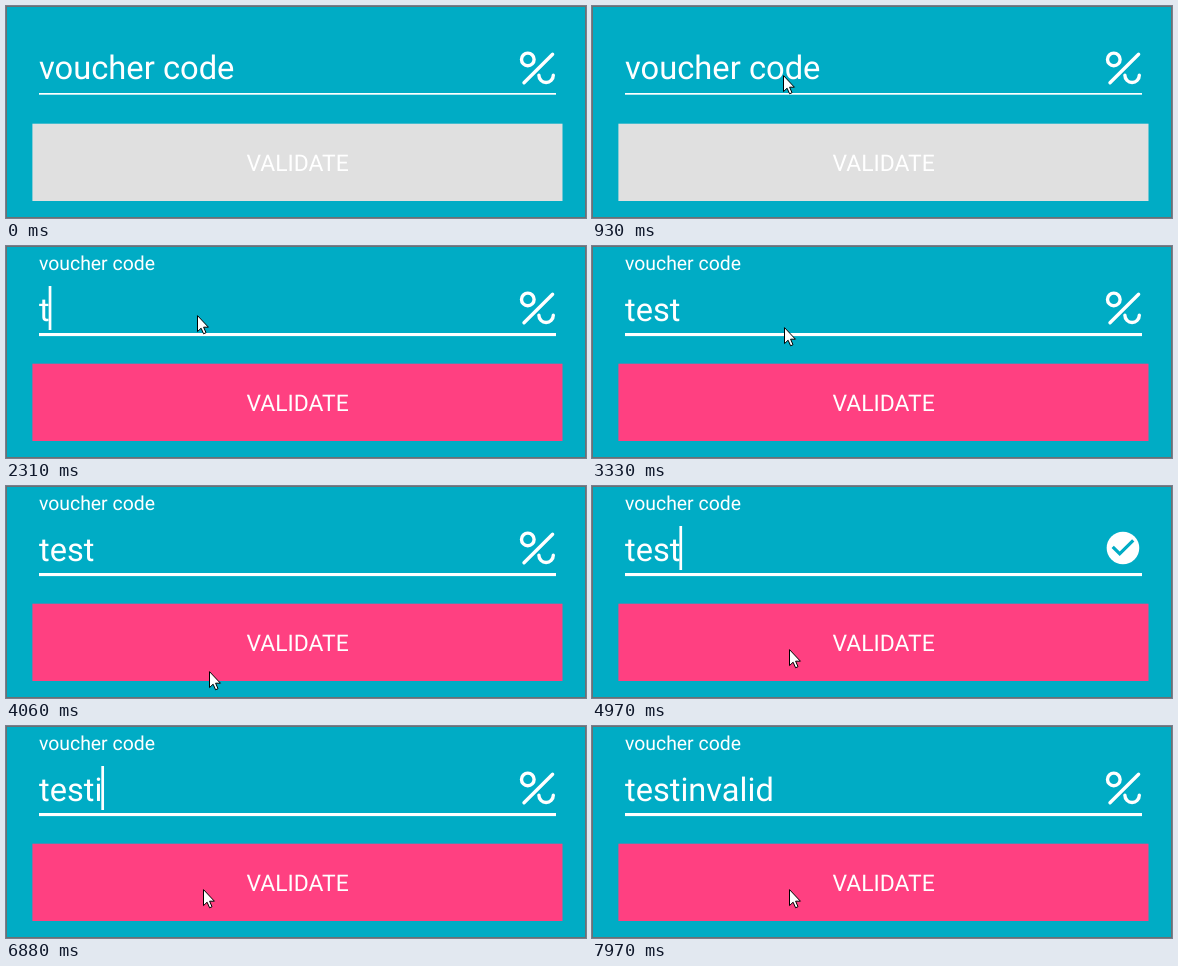
An HTML page that plays this animation: 580 px wide and 212 px high, repeating every 8 s.

```html
<!DOCTYPE html>
<html lang="en">
<head>
<meta charset="utf-8">
<title>Voucher code field</title>
<style>
  html, body { margin: 0; width: 100%; height: 100%; overflow: hidden; background: #00acc5; }
  svg { display: block; width: 580px; height: 212px; }
  text { font-family: Roboto, Arial, sans-serif; fill: #fff; text-rendering: geometricPrecision; }
</style>
</head>
<body>
<svg viewBox="0 0 580 212" xmlns="http://www.w3.org/2000/svg">
  <defs>
    <clipPath id="fieldBox"><rect x="26.4" y="30" width="530" height="66"/></clipPath>
  </defs>
  <rect width="580" height="212" fill="#00acc5"/>
  <rect x=".5" y=".5" width="579" height="211" fill="none" stroke="#6b7073"/>

  <g clip-path="url(#fieldBox)">
    <g id="field">
      <rect id="line" x="33" y="87" width="517" fill="#fff"/>
      <text id="value" x="33" y="75" font-size="32.6"></text>
      <rect id="caret" y="40" width="2.7" height="44" fill="#fff"/>
      <g id="percent" fill="none" stroke="#fff" stroke-width="3.4" stroke-linecap="round">
        <circle cx="521.8" cy="53.4" r="6.3"/>
        <path d="M546.6 48.2 L518 76.8"/>
        <path d="M532.9 69.3 a7.2 7.2 0 0 0 14.4 0"/>
      </g>
      <g id="check" transform="translate(511.4 42.4) scale(1.63)">
        <circle cx="12" cy="12" r="10" fill="#fff"/>
        <path d="M10 17 L5 12 L6.4 10.6 L10 14.2 L17.6 6.6 L19 8 Z" fill="#00acc5"/>
      </g>
    </g>
  </g>
  <text id="label" x="33">voucher code</text>

  <rect id="button" x="26.4" y="117.7" width="530.1" height="77.3"/>
  <text x="291.6" y="165" font-size="22.9" text-anchor="middle">VALIDATE</text>

  <path id="mouse" d="M.5 .6 V16.6 L4.1 13.2 L6.6 18.8 L9 17.7 L6.6 12.2 H11.4 Z"
        fill="#fff" stroke="#000" stroke-linejoin="round"/>
</svg>
<script>
const LOOP = 8000, FRAME = 86, BLINK = 500;
const FOCUS = 1440, ENTER = 560, VALID = 4890;
const $ = id => document.getElementById(id);

// Text arrives between start and end; pace above 1 speeds up as it goes.
const bursts = [
  { start: 2310, end: 2520, text: "test", pace: 1 },
  { start: 6880, end: 7465, text: "invalid", pace: 1.7 }
];

const moves = [
  { start: 474, ms: 430, from: [197, 115], to: [191, 69], bow: -8 },
  { start: 3244, ms: 430, from: [191, 69], to: [203, 185], bow: 0 },
  { start: 4060, ms: 344, from: [203, 185], to: [197, 163], bow: 0 }
];

const mix = (a, b, p) => a + (b - a) * p;
const smooth = p => p * p * (3 - 2 * p);
const show = (el, on) => el.setAttribute("visibility", on ? "visible" : "hidden");
const set = (el, attrs) => {
  for (const key in attrs) el.setAttribute(key, attrs[key]);
};

// Share of a movement done, advancing in whole screen frames.
function progress(t, start, ms) {
  const done = Math.floor((t - start) / FRAME) * FRAME / ms;
  return Math.min(1, Math.max(0, done));
}

function typedText(t) {
  return bursts.filter(b => t >= b.start).map(b => {
    const share = Math.min(1, (t - b.start) / (b.end - b.start));
    const more = (b.text.length - 1) * share ** b.pace;
    return b.text.slice(0, 1 + Math.floor(more + 1e-6));
  }).join("");
}

// Steady while typing, then blinking from the last key.
function caretShown(t) {
  if (t < FOCUS) return false;
  const last = bursts.filter(b => t >= b.start).pop();
  const idle = t - (last ? last.end : FOCUS);
  return idle < 0 || idle % (2 * BLINK) < BLINK;
}

function mousePos(t) {
  const m = moves.filter(m => t >= m.start).pop() || moves[0];
  const p = smooth(progress(t, m.start, m.ms));
  const x = mix(m.from[0], m.to[0], p) + m.bow * Math.sin(Math.PI * p);
  return [Math.round(x), Math.round(mix(m.from[1], m.to[1], p))];
}

// Grows to 1.1 and back on a cosine ease.
function pulse(t) {
  const eased = .5 - Math.cos(Math.PI * progress(t, VALID, 625)) / 2;
  return 1 + .1 * (1 - Math.abs(2 * eased - 1));
}

function draw(t) {
  const value = $("value");
  value.textContent = typedText(t);
  const end = 33 + (value.textContent ? value.getComputedTextLength() : 0);
  set($("caret"), { x: Math.max(33.4, end - 1) });
  show($("caret"), caretShown(t));

  const rise = smooth(progress(t, FOCUS - 36, 4 * FRAME));
  set($("label"), { y: mix(72.7, 24, rise), "font-size": mix(32.7, 19.4, rise) });
  set($("line"), { height: rise ? 3.1 : 1.7 });
  set($("button"), { fill: value.textContent ? "#ff4081" : "#e0e0e0" });

  const valid = t >= VALID && t < bursts[1].start;
  show($("check"), valid);
  show($("percent"), !valid);
  set($("field"), { transform: `translate(291.5 63) scale(${pulse(t)}) translate(-291.5 -63)` });

  show($("mouse"), t >= ENTER);
  set($("mouse"), { transform: `translate(${mousePos(t)})` });
}

const began = performance.now();
function tick() {
  draw((performance.now() - began) % LOOP);
  requestAnimationFrame(tick);
}
tick();
</script>
</body>
</html>
```
